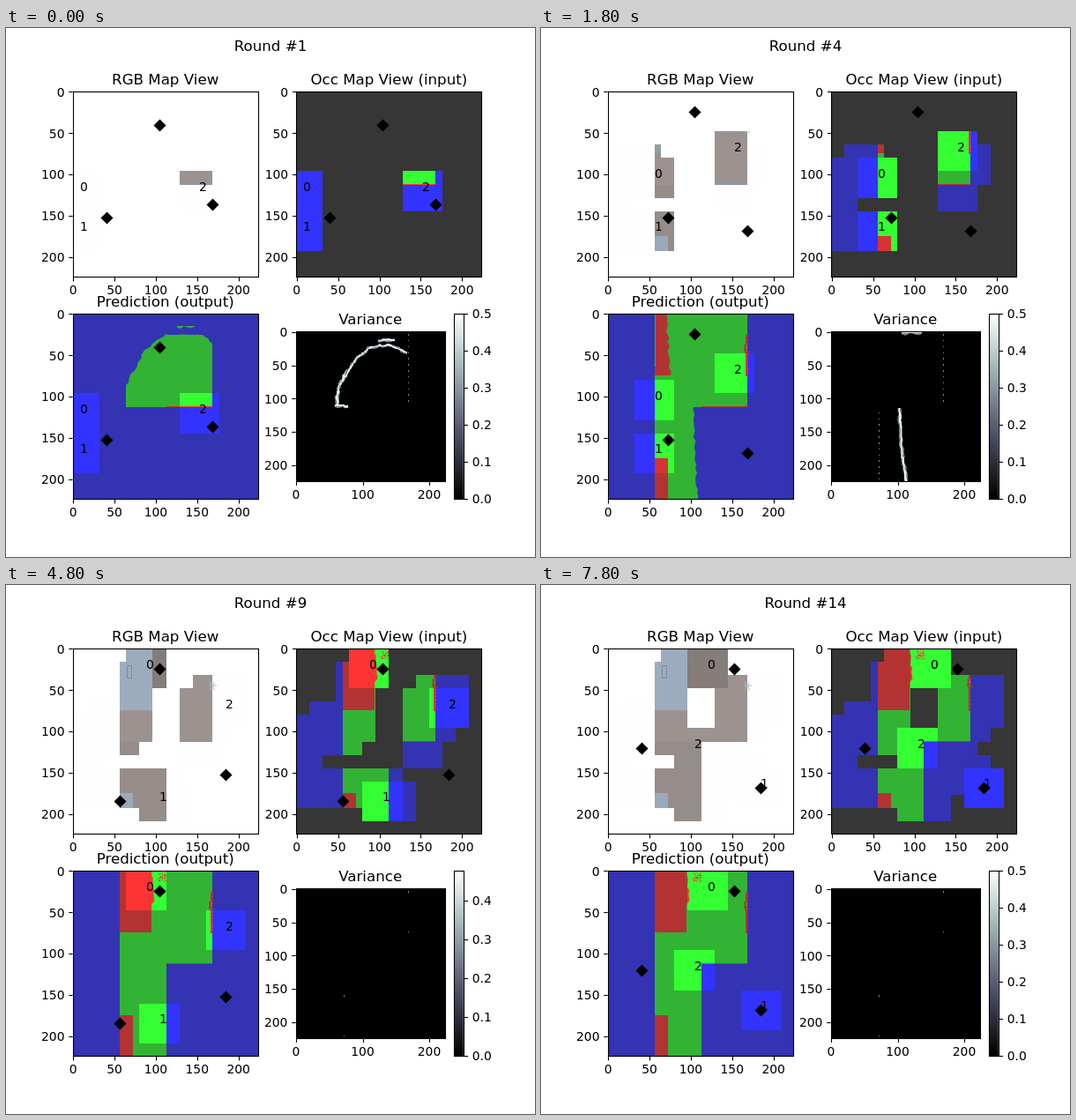
Recreate the animation shown at these times as an HTML page with a canvas. Size 600 by 600 pixels, loop 8 s.

```html
<!DOCTYPE html>
<html lang="en">
<head>
<meta charset="utf-8">
<title>Exploration rounds</title>
<style>
  html, body { margin: 0; width: 100%; height: 100%; overflow: hidden; background: #fff; }
  canvas { display: block; }
</style>
</head>
<body>
<canvas id="stage" width="600" height="600"></canvas>
<script>
const ROUND_MS = 600, LOOP_MS = 8000, ROUNDS = 14;
const MAP = 224, CELL = 16, VIEW = 48;
const DIM = { wall: '#3333b3', free: '#33b333', block: '#b33333', rubble: '#b33333' };
const LIT = { wall: '#3333ff', free: '#33ff33', block: '#ff3333', rubble: '#d63333' };

const ctx = document.getElementById('stage').getContext('2d');
ctx.imageSmoothingEnabled = false;
// Every map is painted at one pixel per map unit, then scaled into its panel
const mapCanvas = document.createElement('canvas');
mapCanvas.width = mapCanvas.height = MAP;
const map = mapCanvas.getContext('2d');

const noise = i => { const s = Math.sin(i * 12.9898) * 43758.5453; return s - Math.floor(s); };
const forRound = (list, round) => list.find(item => round <= item.until);
const cellCentre = cell => cell.map(c => CELL / 2 + CELL * c);

// Agents step one cell per round towards each waypoint; `until` ends its leg
const at = (until, ...cell) => ({ until, cell });
const agents = [
  { start: [0, 7], legs: [at(3, 2, 5), at(4, 3, 6), at(8, 4, 2), at(13, 6, 1), at(14, 7, 1)] },
  { start: [0, 10], legs: [at(7, 6, 10), at(8, 7, 11), at(9, 6, 11), at(11, 8, 9), at(13, 10, 9), at(14, 11, 10)] },
  { start: [9, 7], legs: [at(2, 9, 6), at(3, 10, 5), at(4, 9, 4), at(6, 11, 3), at(9, 11, 4), at(11, 9, 6), at(14, 6, 7)] }
];
function route({ start, legs }) {
  const cells = [start];
  for (let round = 2; round <= ROUNDS; round++) {
    const target = forRound(legs, round).cell;
    cells.push(cells[round - 2].map((c, axis) => c + Math.sign(target[axis] - c)));
  }
  return cells.map(cellCentre);
}
const routes = agents.map(route);
const positions = round => routes.map(cells => cells[round - 1]);

const goals = [
  { until: 1, cells: [[6, 2], [2, 9], [10, 8]] },
  { until: 3, cells: [[3, 3], [10, 2], [7, 10]] },
  { until: 4, cells: [[6, 1], [4, 9], [10, 10]] },
  { until: 7, cells: [[4, 1], [11, 3], [7, 10]] },
  { until: 12, cells: [[6, 1], [11, 9], [3, 11]] },
  { until: 14, cells: [[9, 1], [2, 7], [11, 10]] }
];

// Corridor whose lower arm ends at the given right edge
const corridor = edge => `56,0 168,0 168,112 ${edge} 56,224`;
const world = { free: [corridor('112,112 112,224')], block: ['56,0 95,0 98,33 95,44 95,74 56,74'] };

const predictions = [
  { until: 1, max: .5, width: 4, free: ['64,112 64,86 88,42 112,24 156,26 168,36 168,112', '125,15 146,15 146,16 125,17'], block: [],
    unsure: ['60,112 62,86 76,58', '61,110 64,82 90,40 112,24 138,20 166,32', '122,14 147,13', '58,111 78,112'] },
  { until: 3, max: .66, width: 4, free: ['57,9 164,10 168,18 168,112 97,112 108,174 57,174'],
    block: ['57,0 68,0 80,9 118,12 127,40 118,75 57,75', '57,174 138,174 153,198 142,224 57,224'],
    unsure: ['74,3 124,9 164,12', '121,14 127,44 120,73', '98,114 108,172', '100,174 152,178', '138,178 145,200 146,223', '151,180 154,202 147,223'] },
  { until: 5, max: .5, width: 5, free: [corridor('103,112 105,178 108,224')], block: ['57,0 70,0 75,74 57,74'],
    unsure: ['102,114 105,172 112,224', '106,2 136,1'] },
  { until: 7, max: .5, width: 2.5, free: [corridor('120,112 123,224')], block: ['57,0 96,0 99,36 109,47 52,47 57,28'],
    unsure: ['55,2 54,38 50,46', '97,1 98,36 110,47', '117,113 122,224'] },
  { until: 10, max: .478, width: 1, ...world, unsure: [] },
  { until: 12, max: .5, width: 1, ...world, unsure: ['113,112 110,138'] },
  { until: 14, max: .5, width: 1, ...world, unsure: [] }
];

// Traces key points; slanted edges get a ragged outline
function trace(points, seed = 1) {
  const keys = points.split(' ').map(pair => pair.split(',').map(Number));
  map.beginPath();
  map.moveTo(...keys[0]);
  for (let k = 1; k < keys.length; k++) {
    const [x0, y0] = keys[k - 1], [x1, y1] = keys[k], dx = x1 - x0, dy = y1 - y0;
    const parts = dx && dy ? Math.ceil(Math.hypot(dx, dy) / 5) : 1;
    for (let i = 1; i < parts; i++) {
      const wobble = () => (noise(++seed + x0 + y1) - .5) * 3;
      map.lineTo(x0 + dx * i / parts + wobble(), y0 + dy * i / parts + wobble());
    }
    map.lineTo(x1, y1);
  }
}

function fillShapes(shapes, color) {
  map.fillStyle = color;
  for (const shape of shapes) { trace(shape); map.fill(); }
}

function block(color, x, y, w, h) {
  map.fillStyle = color;
  map.fillRect(x, y, w, h);
}

// Speckled clutter: a plant at the top and a ragged strip on the right wall
function plant(color) {
  for (let i = 0; i < 45; i++) {
    const reach = 6.5 * noise(i), angle = i * 2.4;
    block(color, Math.round(107 + reach * Math.cos(angle)), Math.round(8 + reach * Math.sin(angle)), 1, 1);
  }
}
function strip(color) {
  for (let y = 26; y < 75; y++) {
    const spread = y > 36 && y < 52 ? 3 : 1;
    block(color, 166 - Math.floor(noise(y) * spread), y, 2 + Math.floor(noise(y + 9) * (spread + 1)), 1);
  }
}

function clipToViews(spots, paint) {
  map.save();
  map.beginPath();
  for (const [x, y] of spots) map.rect(x - VIEW / 2, y - VIEW / 2, VIEW, VIEW);
  map.clip();
  paint();
  map.restore();
}
const explored = round => routes.flatMap(cells => cells.slice(0, round));

function paintClasses(shapes, colors) {
  block(colors.wall, 0, 0, MAP, MAP);
  fillShapes(shapes.free, colors.free);
  fillShapes(shapes.block, colors.block);
  block(colors.block, 113, 111, 55, 1);
  if (!shapes.block.length) return;
  block(colors.rubble, 56, 174, 16, 50);
  strip(colors.block);
}

function paintSeen(round) {
  const show = (spots, colors) => clipToViews(spots, () => {
    paintClasses(world, colors);
    plant(colors.block);
  });
  show(explored(round), DIM);
  show(positions(round), LIT);
}

function paintPhoto(round) {
  const cloth = round < 8 ? '#909f9f' : '#9cacbf';
  block('#fff', 0, 0, MAP, MAP);
  clipToViews(explored(round), () => {
    block('#fefefe', 0, 0, MAP, MAP);
    fillShapes(world.free, '#9c9290');
    block('#867c79', 96, 0, 48, 48);
    block('#968d8b', 56, 112, 56, 112);
    block(cloth, 56, 0, 40, 74);
    block('#9aaabb', 56, 174, 16, 50);
    block('#8799a5', 128, 111, 40, 1);
    map.strokeStyle = '#7f8b98';
    map.strokeRect(65.5, 20.5, 5, 15);
    plant('#747b7d');
    map.strokeStyle = '#a9b8c6';
    for (let i = 0; i < 3; i++) {
      const dx = 5 * Math.cos(i * 1.05), dy = 6 * Math.sin(i * 1.05);
      map.beginPath();
      map.moveTo(168 - dx, 45 - dy);
      map.lineTo(168 + dx, 45 + dy);
      map.stroke();
    }
  });
}

function paintVariance({ unsure, width }, round) {
  block('#000', 0, 0, MAP, MAP);
  const layers = [['#76868c', width], ['#f4f8f8', width / 2]];
  for (const path of unsure) {
    layers.forEach(([color, lineWidth], layer) => {
      Object.assign(map, { strokeStyle: color, lineWidth });
      trace(path, layer * 50);
      map.stroke();
    });
  }
  map.lineWidth = 1;
  // Faint specks along the two straight walls, fading out over the rounds
  const step = round < 6 ? 9 : 60;
  for (let y = 4; y < 112; y += step) {
    block('#889', 167, y, 1, 2);
    if (round > 3) block('#889', 71, MAP - y, 1, 2);
  }
}

function text(str, x, y, size = 13.89, align = 'center') {
  ctx.font = size + 'px "DejaVu Sans", sans-serif';
  ctx.textAlign = align;
  ctx.fillStyle = '#000';
  ctx.fillText(str, x, Math.round(y));
}

const snap = v => Math.round(v) + .5;

function line(x1, y1, x2, y2) {
  ctx.beginPath();
  ctx.moveTo(x1, y1);
  ctx.lineTo(x2, y2);
  ctx.stroke();
}

function frame(x, y, w, h) {
  ctx.strokeStyle = '#000';
  ctx.lineWidth = 1.1;
  ctx.strokeRect(snap(x), snap(y), snap(x + w) - snap(x), snap(y + h) - snap(y));
}

function panel(title, x, y, size, xStep, paint) {
  const scale = size / MAP, extent = Math.round(size) + 1;
  paint();
  ctx.drawImage(mapCanvas, Math.round(x), Math.round(y), extent, extent);
  frame(x, y, size, size);
  for (let v = 0; v < MAP; v += 50) {
    const offset = (v + .5) * scale, tx = x + offset, ty = y + offset;
    line(x - 4.4, snap(ty), x, snap(ty));
    text(v, x - 9.2, ty + 5.2, 13.89, 'right');
    if (v % xStep) continue;
    line(snap(tx), y + size, snap(tx), y + size + 5.4);
    text(v, tx, y + size + 20.3);
  }
  text(title, x + size / 2, y - 8.4, 16.67);
}

function markers(round, x, y) {
  const place = ([mx, my]) => [x + (mx + .5) * .9375, y + (my + .5) * .9375];
  positions(round).forEach((spot, i) => {
    const [px, py] = place(spot);
    text(i, Math.round(px), py, 13.89, 'left');
  });
  for (const cell of forRound(goals, round).cells) {
    const [px, py] = place(cellCentre(cell)).map(snap), r = 7;
    ctx.beginPath();
    ctx.moveTo(px, py - r);
    ctx.lineTo(px + r, py);
    ctx.lineTo(px, py + r);
    ctx.lineTo(px - r, py);
    ctx.fill();
  }
}

function colorbar(max) {
  const x = 508.3, y = 324, w = 10.5, h = 210;
  const ramp = ctx.createLinearGradient(0, y + h, 0, y);
  [[0, '#000'], [.365, '#51546a'], [.746, '#acc0c2'], [1, '#fff']].forEach(stop => ramp.addColorStop(...stop));
  ctx.fillStyle = ramp;
  ctx.fillRect(x, y, w, h);
  frame(x, y, w, h);
  for (let i = 0; i / 10 <= max; i++) {
    const ty = y + h - i / 10 / max * h;
    line(519.5, snap(ty), 524, snap(ty));
    text((i / 10).toFixed(1), 528.7, ty + 5.2, 13.89, 'left');
  }
}

function draw(round) {
  const prediction = forRound(predictions, round);
  const left = 75.68, right = 329.32, top = 72, bottom = 324, size = 210;
  ctx.fillStyle = '#fff';
  ctx.fillRect(0, 0, 600, 600);
  text('Round #' + round, 300, 26, 16.67);
  panel('RGB Map View', left, top, size, 50, () => paintPhoto(round));
  panel('Occ Map View (input)', right, top, size, 50, () => {
    block('#363636', 0, 0, MAP, MAP);
    paintSeen(round);
  });
  panel('Prediction (output)', left, bottom, size, 50, () => {
    paintClasses(prediction, DIM);
    paintSeen(round);
  });
  panel('Variance', 328.64, 344.45, 169.1, 100, () => paintVariance(prediction, round));
  for (const corner of [[left, top], [right, top], [left, bottom]]) markers(round, ...corner);
  colorbar(prediction.max);
}

let shown = 0;
function tick() {
  const round = Math.floor(performance.now() % LOOP_MS / ROUND_MS) + 1;
  if (round !== shown) draw(shown = round);
  requestAnimationFrame(tick);
}
tick();
</script>
</body>
</html>
```
